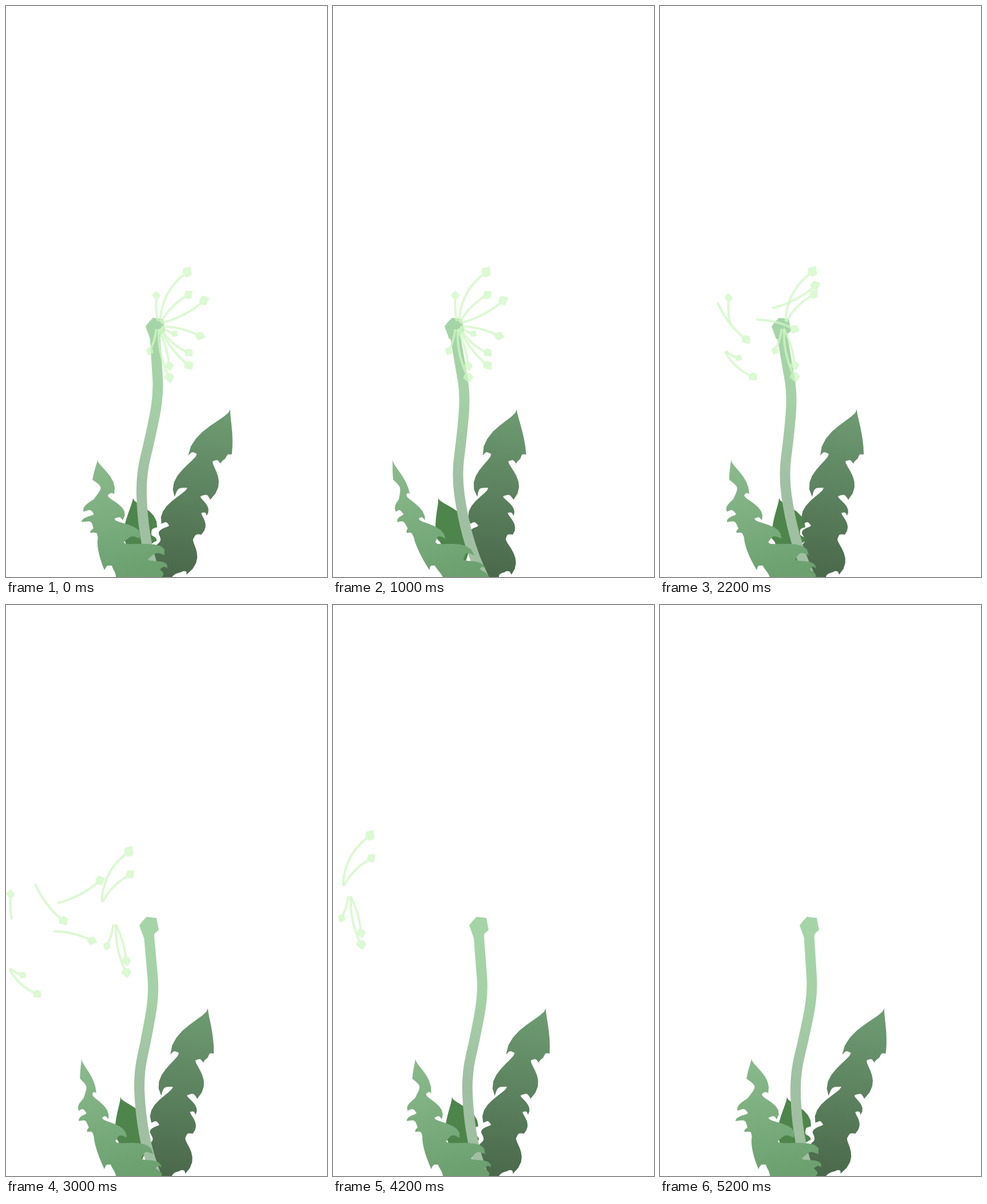
These frames come from a looping animation (561 px wide and 998 px high, 5.4 s). An HTML page:

```html
<!DOCTYPE html>
<html lang="en">
<head>
<meta charset="utf-8">
<title>Dandelion in the wind</title>
<style>
html, body { margin: 0; width: 100%; height: 100%; overflow: hidden; background: #fff; }
svg { display: block; width: 100%; height: 100%; }
.seed { opacity: .75; fill: #d0f7c3; stroke: #d0f7c3; stroke-width: 2; stroke-linejoin: round; }
.stalk { fill: none; stroke-width: 4; stroke-linecap: round; }
.stem { fill: none; stroke: url(#stemFill); stroke-width: 18; }
</style>
</head>
<body>
<svg id="stage" viewBox="0 0 561 998">
  <defs>
    <linearGradient id="stemFill" gradientUnits="userSpaceOnUse" x1="0" y1="550" x2="0" y2="998">
      <stop offset="0" stop-color="#a5d5a7"/><stop offset=".3" stop-color="#a4d1a6"/>
      <stop offset=".62" stop-color="#a0c0a2"/><stop offset="1" stop-color="#a0bfa2"/>
    </linearGradient>
    <linearGradient id="leftFill" gradientUnits="userSpaceOnUse" x1="150" y1="790" x2="205" y2="998">
      <stop offset="0" stop-color="#8bbb8d"/><stop offset="1" stop-color="#6ca06f"/>
    </linearGradient>
    <linearGradient id="rightFill" gradientUnits="userSpaceOnUse" x1="340" y1="715" x2="300" y2="998">
      <stop offset="0" stop-color="#6d9a71"/><stop offset="1" stop-color="#4a694b"/>
    </linearGradient>
  </defs>
</svg>
<script>
const STEP = 200, FRAMES = 27, GROUND = 998, GONE = 24;
const stage = document.getElementById('stage');

function add(parent, tag, attrs) {
  const el = document.createElementNS('http://www.w3.org/2000/svg', tag);
  for (const k in attrs) el.setAttribute(k, attrs[k]);
  return parent.appendChild(el);
}
const mix = (a, b, k) => a + (b - a) * k;
const parse = text => text.split(' ').map(p => p.split(',').map(Number));
const polygon = points => 'M' + points.map(p => p.map(v => v.toFixed(1))).join('L') + 'Z';

// Index of the key segment holding t, and the progress through it.
function locate(times, t) {
  let i = 0;
  while (i < times.length - 2 && t > times[i + 1]) i++;
  return [i, (t - times[i]) / (times[i + 1] - times[i])];
}

function cubic(a, b, c, d) {
  return Array.from({ length: 8 }, (_, i) => {
    const t = (i + 1) / 8, s = 1 - t;
    return a.map((v, j) => s * s * s * v + 3 * s * s * t * b[j] + 3 * s * t * t * c[j] + t * t * t * d[j]);
  });
}

// One leaf edge from the apex down: a full shoulder into each tooth, a scoop back to each notch.
function edge(points, out) {
  return points.slice(1).flatMap((q, i) => {
    const p = points[i], dx = q[0] - p[0], dy = q[1] - p[1], len = Math.hypot(dx, dy);
    if (i % 2) {
      const scoop = [(p[0] + q[0]) / 2 - .4 * out * dy, (p[1] + q[1]) / 2 + .4 * out * dx];
      return cubic(p, scoop, scoop, q);
    }
    const swell = i ? Math.max(0, .45 * len - .5 * Math.abs(dx)) : 0;
    return cubic(p, [p[0], p[1] + .15 * len], [q[0] + out * swell, q[1] - .45 * len], q);
  });
}

function leaf(name, fill, apex, right, left) {
  const outline = [apex, ...edge([apex, ...parse(right)], 1), ...edge([apex, ...parse(left)], -1).reverse()];
  const el = add(stage, 'path', { fill });
  return pose => el.setAttribute('d', polygon(outline.map(([x, y]) => {
    const up = Math.max(0, (GROUND - y) / (GROUND - apex[1]));
    const rib = apex[0] + 108 * (1 - up) ** 2;
    const spread = name === 'left' ? pose.spread * (x - rib) : 0;
    return [x + up ** .7 * (pose[name] + spread), y];
  })));
}

function stem() {
  const line = parse('260,570 263,620 267,680 252,755 236,820 238,890 248,955 268,1014');
  const crown = parse('244,560 250,552 257,545 274,547 278,568 271,574 268,582 252,582');
  const stalk = add(stage, 'path', { class: 'stem' });
  const head = add(stage, 'path', { fill: 'url(#stemFill)', d: polygon(crown) });
  return pose => {
    const bent = line.map(([x, y]) => [x + pose.stem * (GROUND - y) / 440, y]);
    let d = 'M' + bent[0];
    for (let i = 1; i < bent.length - 1; i++) {
      const [a, b] = [bent[i], bent[i + 1]];
      d += `Q${a} ${(a[0] + b[0]) / 2} ${(a[1] + b[1]) / 2}`;
    }
    stalk.setAttribute('d', d + 'L' + bent.at(-1));
    head.setAttribute('transform', `translate(${pose.stem} 0)`);
  };
}

const plant = [
  leaf('back', '#4e854b', [208, 860],
    '254,911 245,924 255,935 248,950 240,970', '195,930 196,950 215,970'),
  leaf('right', 'url(#rightFill)', [344, 705],
    '356,784 346,790 338,800 324,796 329,863 311,857 327,891 317,886 323,924 310,932 313,994 304,988 290,998',
    '280,786 295,783 266,858 286,842 250,905 264,908 248,922 245,945 262,998'),
  stem(),
  leaf('left', 'url(#leftFill)', [124, 793],
    '156,853 147,855 178,899 165,896 212,931 189,937 260,960 236,967 273,983 262,984 272,998',
    '121,828 129,860 117,884 133,888 117,902 137,913 134,921 147,929 169,986 180,978 192,998')
];

// Sideways lean of each part; spread opens or closes the left leaf.
const still = { stem: 0, right: 48, left: 36, back: 14, spread: .28 };
const light = { stem: -6, right: 28, left: 20, back: 0, spread: 0 };
const breeze = { stem: -11, right: 9, left: 8, back: -8, spread: -.25 };
const wind = { stem: -49, right: 0, left: 0, back: 0, spread: 0 };
const gust = { stem: -49, right: -23, left: -20, back: -24, spread: -.33 };
const sway = [
  [0, still], [1, light], [2, breeze], [4, wind], [5, gust], [11, wind],
  [15, breeze], [18, wind], [21, light], [22, still], [24, breeze], [26, still]
];

// Each flight lets go at a frame, then passes its stops at the shared times.
const STOPS = [11, 15, 18, 21];
const flights = [
  { release: 7.5, path: '-143,4 -255,-1', seeds: [[263, 506, .07]] },
  { release: 10, path: '-75,-26 -182,-33 -311,-35', seeds: [[346, 515, -.12]] },
  { release: 8.5, path: '-104,-12 -189,10 -276,39', seeds: [[339, 577, .12]] },
  { release: 7, path: '-157,42 -265,74 -308,49', seeds: [[319, 606, -.17], [294, 573, -.1]] },
  { release: 7, path: '-169,-45 -219,-76 -275,-95', seeds: [[319, 628, -.12]] },
  { release: 11, path: '-50,-1 -102,-34 -169,-86 -252,-62', seeds: [[317, 465, .24], [319, 505, .15]] },
  { release: 11, path: '-50,-1 -75,-7 -193,-12 -236,-56', seeds: [[251, 603, .1], [285, 629, .1], [285, 649, -.13]] }
];

function seed(parent, [x, y, bow]) {
  const hub = [265, 558], reach = Math.hypot(x - hub[0], y - hub[1]);
  const ux = (x - hub[0]) / reach, uy = (y - hub[1]) / reach;
  const root = [hub[0] + 9 * ux, hub[1] + 9 * uy], len = reach - 9;
  const bend = [(root[0] + x) / 2 + bow * len * uy, (root[1] + y) / 2 - bow * len * ux];
  const size = 4.6 + .045 * len;
  const tip = parse('1.1,0 -.1,.9 -.9,.25 -.6,-.6 .2,-.95')
    .map(([a, b]) => [x + size * (a * ux - b * uy), y + size * (a * uy + b * ux)]);
  const g = add(parent, 'g', { class: 'seed' });
  add(g, 'path', { class: 'stalk', d: `M${root}Q${bend} ${x} ${y}` });
  add(g, 'path', { d: polygon(tip) });
}

for (const f of flights) {
  f.el = add(stage, 'g', {});
  f.seeds.forEach(s => seed(f.el, s));
  const stops = parse(f.path);
  f.points = f.release < STOPS[0] ? [[wind.stem, 1], ...stops] : stops;
  f.times = f.release < STOPS[0] ? [f.release, ...STOPS] : STOPS;
  f.times = f.times.slice(0, f.points.length);
}

function draw(frame) {
  const [i, k] = locate(sway.map(s => s[0]), frame);
  const from = sway[i][1], to = sway[i + 1][1], pose = {};
  for (const name in from) pose[name] = mix(from[name], to[name], k);
  plant.forEach(bend => bend(pose));

  for (const f of flights) {
    let at = [pose.stem, 0];
    if (frame >= f.release) {
      const [n, p] = locate(f.times, frame);
      at = at.map((_, j) => mix(f.points[n][j], f.points[n + 1][j], p));
    }
    f.el.setAttribute('transform', `translate(${at})`);
    f.el.setAttribute('visibility', frame < GONE ? 'visible' : 'hidden');
  }
}

const start = performance.now();
function tick() {
  draw(Math.floor((performance.now() - start) / STEP) % FRAMES);
  requestAnimationFrame(tick);
}
tick();
</script>
</body>
</html>
```
